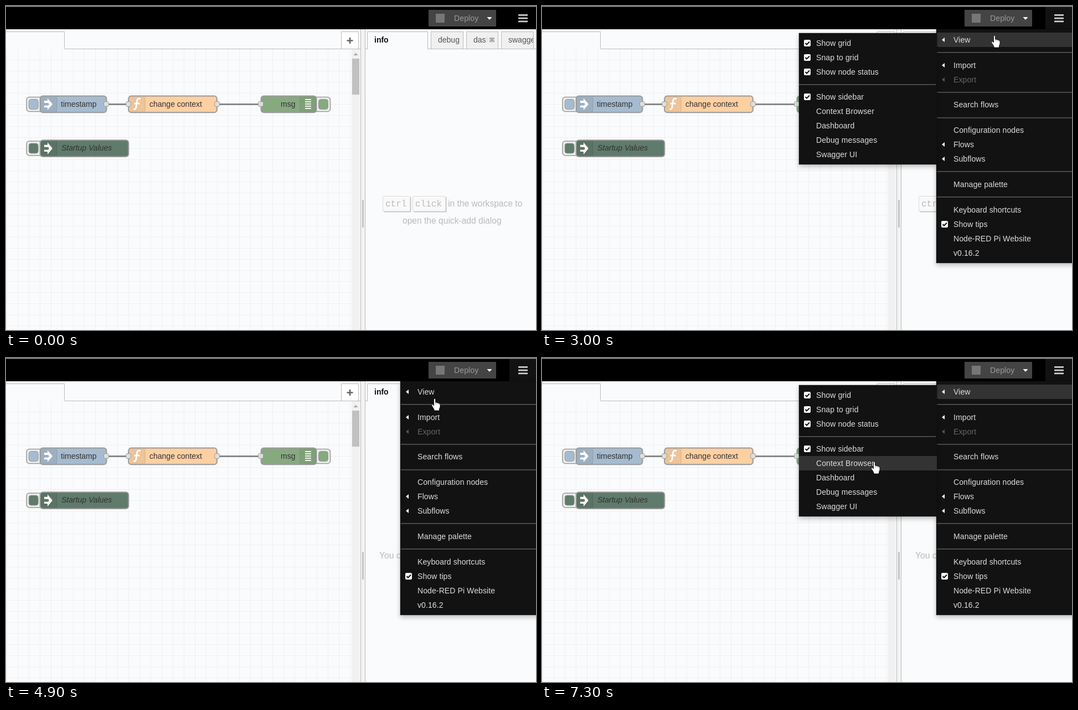
Recreate the animation shown at these times as an HTML page. Size 957 px wide and 585 px high, loop 8 s.

```html
<!DOCTYPE html>
<html lang="en">
<head>
<meta charset="utf-8">
<title>Flow editor menu</title>
<style>
html, body { margin: 0; width: 957px; height: 585px; overflow: hidden; background: #fff; }
svg { display: block; font: 14px "Liberation Sans", Arial, sans-serif; }
text { white-space: pre; }
.menu { filter: drop-shadow(0 4px 4px rgba(0, 0, 0, .24)); }
.menu text { letter-spacing: .1px; }
.key { font: 16px "Liberation Mono", monospace; }
.tip { font-size: 15.6px; fill: #bbb; }
</style>
</head>
<body>
<svg id="stage" width="957" height="585" viewBox="0 0 957 585"></svg>
<script>
const rect = (x, y, w, h, fill, more = '') =>
  `<rect x="${x}" y="${y}" width="${w}" height="${h}" fill="${fill}" ${more}/>`;
const text = (x, y, str, fill, more = '') => `<text x="${x}" y="${y}" fill="${fill}" ${more}>${str}</text>`;
const path = (d, fill, more = '') => `<path d="${d}" fill="${fill}" ${more}/>`;
const line = (d, stroke, width = 1) => path(d, 'none', `stroke="${stroke}" stroke-width="${width}"`);
const group = (id, body, more = '') => `<g id="${id}" ${more}>${body}</g>`;

const EDGE = 'stroke="#999"';
const BORDER = '#bbb';
const PAPER = '#f9fbfc';

// Flow nodes
function button(x, y, fill) {
  return rect(x + .5, y + .5, 30, 26, '#eee', `rx="5" ${EDGE} stroke-width="1.6"`) +
    rect(x + (x > 300 ? 9.5 : 4.5), y + 4.5, 17, 18, fill, `rx="4" ${EDGE}`);
}
function node(x, y, w, fill, label, labelX, iconRight, style = '') {
  const ix = iconRight ? x + w - 30 : x;
  const sep = iconRight ? ix : ix + 30;
  return rect(x, y + .5, w, 29.7, fill, `rx="5" ${EDGE} stroke-width="2"`) +
    rect(ix + 1, y + 1.5, 29, 28, 'rgba(0,0,0,.06)', 'rx="4"') +
    line(`M${sep} ${y + 1.5}v28`, 'rgba(0,0,0,.12)') +
    text(labelX, y + 19.5, label, '#333', style);
}
const inject = y => path(`M69 ${y + 9}h6v-4.5l9 10.8-9 10.8v-4.8h-6v-3.6h7l2-2.4-2-2.4h-7z`, '#fff');
const port = x => rect(x - 4.5, 172.5, 9, 9, '#ddd', `rx="3" ${EDGE}`);

function workspace() {
  let grid = '';
  for (let x = 1.5; x < 624; x += 20) grid += `M${x} 78V585`;
  for (let y = 97.5; y < 585; y += 20) grid += `M0 ${y}H624`;
  let bars = '';
  for (let y = 168; y < 188; y += 4) bars += rect(540, y, 11, 1.8, '#fff');
  return rect(0, 42, 640, 543, PAPER) + line(grid, '#eef0f1') +
    line('M0 46.5H105.5V77.5H640', BORDER) +
    rect(605.5, 46.5, 31, 31, '#fff', `stroke="${BORDER}"`) +
    line('M615.5 62.5h11M621 57v11', '#666', 2.6) +
    rect(624, 78, 15, 507, '#f1f1f1') + path('M627.5 89l4-4 4 4z', '#a3a3a3') +
    rect(625, 95, 13, 65, '#c1c1c1') +
    line('M181 177.5H221M381 177.5H460', '#888', 3) +
    button(36.7, 164, '#a6bbcf') + node(61.7, 162, 119.7, '#a6bbcf', 'timestamp', 99) + inject(162) +
    node(221.2, 162, 159.6, '#fdd0a2', 'change context', 259) +
    line('M243 168c-4-2-6 0-6.5 4l-1.5 10c-.5 4-2 5-5 4M231.5 176h10', '#fff', 2.8) +
    button(555, 164, '#87a980') + node(460.6, 162, 99.8, '#87a980', 'msg', 496, true) + bars +
    [181, 221, 381, 460].map(port).join('') +
    button(36.7, 243.5, '#5f7b6b') +
    node(61.7, 241.8, 159.6, '#5f7b6b', 'Startup Values', 100, false, 'font-style="italic"') + inject(241.8);
}

const sideTab = (x, w) => rect(x + .5, 46.5, w, 31, '#f0f0f0', `stroke="${BORDER}"`);
const key = (x, w, label) =>
  rect(x + 1.5, 344.5, w, 28, '#ccc', 'rx="2"') +
  rect(x + .5, 343.5, w - 1, 27, '#f9f9f9', 'rx="2" stroke="#ddd"') +
  text(x + 5, 362, label, '#bbb', 'class="key"');

function sidebar() {
  return rect(640, 42, 9, 543, '#f3f3f3') + line('M640.5 42V585M648.5 42V585', BORDER) +
    rect(643, 350, 3, 50, '#c4c4c4') +
    rect(649, 42, 308, 543, PAPER) +
    sideTab(767, 58) + sideTab(831, 57) + sideTab(894, 58) +
    line('M649 77.5H652.5V46.5H761.5V77.5H957', BORDER) +
    text(665, 66, 'info', '#111', 'font-weight="bold"') +
    text(780, 66, 'debug', '#555') +
    text(844, 66, 'das', '#555') + text(867, 66, 'hb', '#ddd') +
    text(872, 65, '⌘', '#777', 'style="font:11px \'DejaVu Sans\',sans-serif"') +
    `<svg x="895" y="46" width="57" height="31">${text(12, 20, 'swagger', '#555')}</svg>` +
    group('tipA', key(680, 50, 'ctrl') + key(734, 60, 'click') +
      text(798, 362, 'in the workspace to', '', 'class="tip"') +
      text(716, 393, 'open the quick-add dialog', '', 'class="tip"')) +
    group('tipB', text(674, 362, 'You can', '', 'class="tip"'));
}

function header() {
  return rect(0, 0, 957, 42, '#000') + rect(0, 0, 957, 1, '#999') + rect(0, 1, 957, 1, '#444') +
    rect(763, 7, 122, 30, '#444') + rect(776, 14, 16, 16, '#777') +
    text(809, 27, 'Deploy', '#999', 'letter-spacing=".14"') + path('M868.5 20h9l-4.5 5z', '#fff') +
    rect(909, 2, 48, 40, '#121212', 'id="hover"') +
    [15, 20.7, 26.4].map(y => rect(925, y, 17, 2.8, '#d0d0d0', 'rx=".5"')).join('');
}

// Menu rows: [centre y, label, mark]
const check = (x, y) => rect(x, y - 6, 12, 12, '#fff', 'rx="2"') + line(`M${x + 2.5} ${y}l2.5 2.5 5-5`, '#111', 2);
const caret = (y, fill) => path(`M722 ${y}l5-4v8z`, fill);
const mainRows = [
  [61, 'View', '<'], [107, 'Import', '<'], [133, 'Export', 'off'], [178, 'Search flows'],
  [224, 'Configuration nodes'], [250, 'Flows', '<'], [276, 'Subflows', '<'], [322, 'Manage palette'],
  [368, 'Keyboard shortcuts'], [394, 'Show tips', 'x'], [420, 'Node-RED Pi Website'], [446, 'v0.16.2']
];
const subRows = [
  [67, 'Show grid', 'x'], [93, 'Snap to grid', 'x'], [119, 'Show node status', 'x'], [164, 'Show sidebar', 'x'],
  [190, 'Context Browser'], [216, 'Dashboard'], [242, 'Debug messages'], [268, 'Swagger UI']
];
function rows(list, x) {
  return list.map(([y, label, mark]) => {
    const fill = mark === 'off' ? '#666' : '#ddd';
    const icon = !mark ? '' : mark === 'x' ? check(x - 22, y) : caret(y, mark === 'off' ? '#555' : '#fff');
    return icon + text(x, y + 5, label, fill);
  }).join('');
}
const rules = (list, x, w) => list.map(y => rect(x, y, w, 1.6, '#555')).join('');
// Dark panel inside a translucent one-pixel border
const panel = (x, y, w, h) =>
  rect(x + 1, y + 1, w - 2, h - 2, '#121212') +
  rect(x + .5, y + .5, w - 1, h - 1, 'none', 'stroke="#000" stroke-opacity=".2"');

const mainMenu = group('main', panel(711, 41, 260, 424) +
  rect(713, 48, 244, 26, '#333', 'id="viewRow"') +
  rules([83, 155, 201, 298, 344], 713, 244) + rows(mainRows, 743), 'class="menu"');
const subMenu = group('sub', panel(463, 48, 251, 239) +
  rect(464, 54, 249, 26, '#333', 'id="subRow"') +
  rules([141], 464, 247) + rows(subRows, 495), 'class="menu"');

const pointers =
  group('arrow', path('M0 0V16.5L4 13l2.5 6 3-1.2L7 12h5z', '#fff', 'stroke="#000"')) +
  group('hand', path('M-1.5 1.5Q0-1 1.5 1.5V7l2.5.5 3 .8 2 1Q10 10 10 12v3l-1.5 4V22H-1v-2l-3-5-1.5-2.5q0-2 2-1.5l2 2z',
    '#fff', 'stroke="#000" stroke-width=".8"') + line('M1.8 7v4M4.8 8v3M7.5 9v2.5', '#777', .7));

const $ = id => document.getElementById(id);
$('stage').innerHTML = workspace() + sidebar() + header() + mainMenu + subMenu + pointers;

// Pointer track: [ms, x, y]
const track = [
  [800, 943, 35], [900, 940, 30], [1000, 940, 30], [1200, 933, 21], [2200, 933, 21], [2600, 898, 36],
  [2700, 898, 36], [3100, 790, 58], [3500, 790, 58], [3800, 783, 107], [3900, 783, 106],
  [4400, 775, 60], [4900, 774, 73], [5100, 700, 75], [5300, 700, 75], [5500, 639, 69],
  [5800, 715, 60], [6100, 723, 56], [6200, 723, 56], [6600, 637, 77], [6900, 604, 170],
  [7100, 604, 170], [7300, 600, 187]
];
function pointerAt(t) {
  const i = track.findIndex(k => k[0] > t);
  if (i < 0) return track.at(-1).slice(1);
  if (i === 0) return track[0].slice(1);
  const [a, b] = [track[i - 1], track[i]];
  const p = (t - a[0]) / (b[0] - a[0]);
  return [1, 2].map(n => Math.round(a[n] + (b[n] - a[n]) * p));
}

const LOOP = 8000, STEP = 100;
const within = (t, ...spans) => spans.some(([a, b]) => t >= a && t < b);
const show = (id, on) => $(id).setAttribute('visibility', on ? 'visible' : 'hidden');

function draw(t) {
  const [x, y] = pointerAt(t);
  const onHand = within(t, [2900, 5000], [5800, LOOP]);
  const subOpen = within(t, [3000, 3600], [4300, 4700], [5800, LOOP]);
  const row = subOpen && x < 713 && subRows.find(r => Math.abs(y - r[0]) < 13);

  show('hover', t >= 800);
  $('main').style.display = t >= 1600 ? '' : 'none';
  $('sub').style.display = subOpen ? '' : 'none';
  show('viewRow', subOpen);
  show('subRow', row);
  if (row) $('subRow').setAttribute('y', row[0] - 13);
  show('tipA', t < 4600);
  show('tipB', t >= 4600);
  show('arrow', t >= 800 && !onHand);
  show('hand', onHand);
  $(onHand ? 'hand' : 'arrow').setAttribute('transform', `translate(${x} ${y})`);
}

const start = performance.now();
function tick() {
  const t = (performance.now() - start) % LOOP;
  draw(Math.floor(t / STEP) * STEP);
  requestAnimationFrame(tick);
}
tick();
</script>
</body>
</html>
```
